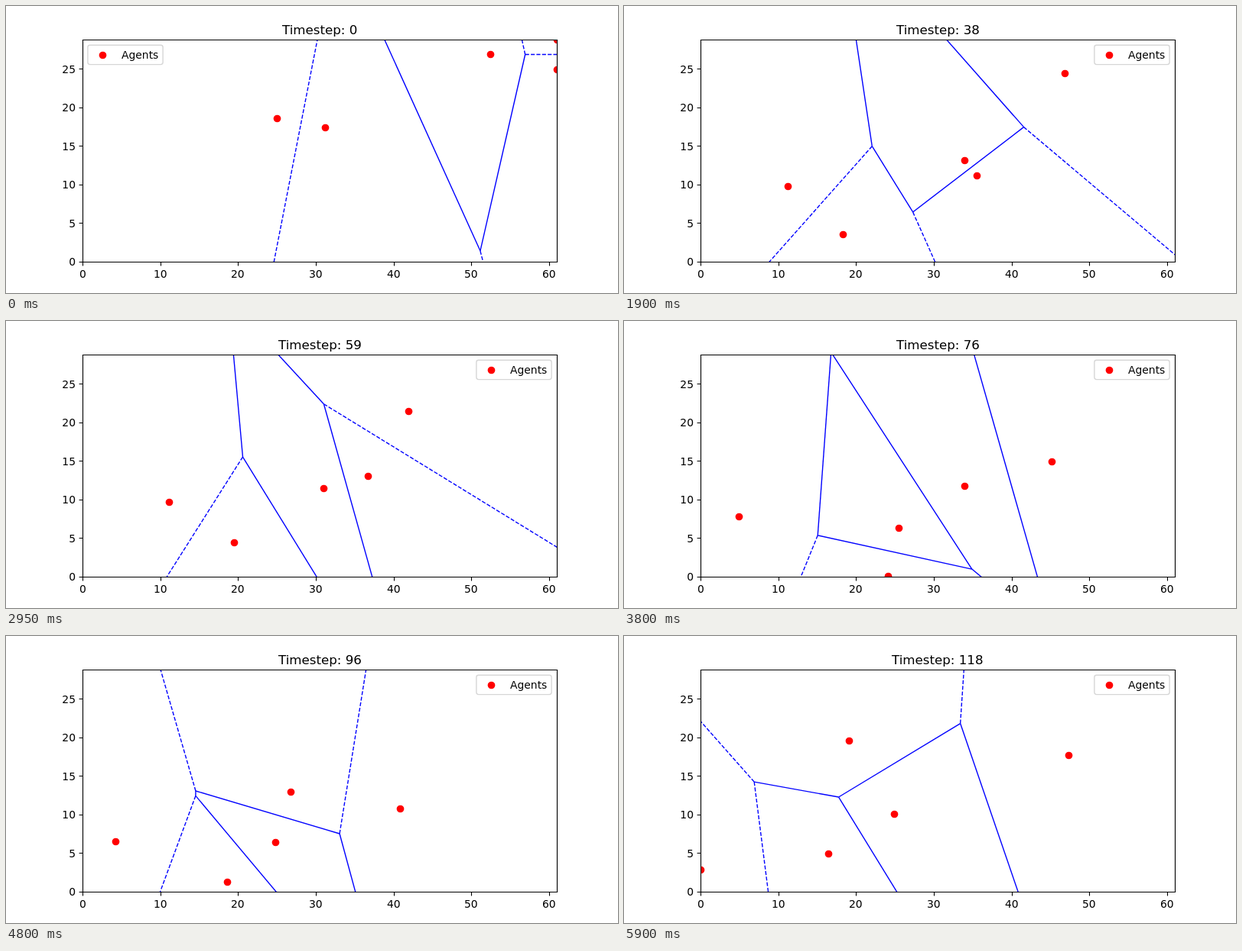
An HTML page for the animation above (5950 ms loop, 800x376 px).

```html
<!DOCTYPE html>
<html lang="en">
<head>
<meta charset="utf-8">
<title>Agents</title>
<style>
html, body { margin: 0; width: 100%; height: 100%; overflow: hidden; background: #fff; }
svg { display: block; width: 800px; height: 376px; }
text { font: 13.89px "DejaVu Sans", sans-serif; fill: #000; }
#title { font-size: 16.67px; }
.end { text-anchor: end; }
#axes { fill: none; stroke: #000; stroke-width: 1.11; }
#edges { stroke: #00f; stroke-width: 1.39; }
.ray { stroke-dasharray: 5.14 2.22; }
circle { fill: #f00; r: 4.86px; }
#frame { fill: #fff; fill-opacity: .8; stroke: #ccc; stroke-opacity: .8; stroke-width: 1.39; }
</style>
</head>
<body>
<svg viewBox="0 0 800 376">
  <clipPath id="plot"><rect x="100" y="44" width="621" height="292"/></clipPath>
  <g clip-path="url(#plot)">
    <g id="edges"></g>
    <g id="dots"></g>
  </g>
  <path id="axes"/>
  <g id="labels"></g>
  <text id="title" y="37"></text>
  <g id="legend">
    <rect id="frame" x="106.9" y="51.2" width="98.2" height="25.4" rx="2.8"/>
    <circle cx="126.5" cy="64.5" r="4.86"/>
    <text x="151" y="69">Agents</text>
  </g>
</svg>
<script>
const STEP = 50, STEPS = 119;
const LEFT = 100, RIGHT = 720, TOP = 44.24, BOTTOM = 334.53;
const KX = 620 / 61, KY = 10.097;
const $ = id => document.getElementById(id);
const clamp = (v, lo, hi) => Math.min(hi, Math.max(lo, v));
const snap = v => Math.floor(v + .5) + .5;

// Each agent glides through one waypoint per time, in pixels
const times = [0, 19, 38, 59, 76, 96, 118];
const agents = [
  [[354, 147.2], [212, 243], [214, 236], [213, 237], [150, 256], [143.4, 268.8], [100, 306]],
  [[417.4, 159.4], [309, 197], [286, 299], [298, 290], [345, 334], [289, 321.8], [267, 285]],
  [[633, 63.2], [430, 191], [445.1, 201.9], [415, 219], [359, 271], [351.7, 270], [353, 233]],
  [[720, 44], [519, 201], [460.9, 222.2], [473, 203], [445, 216], [371.7, 203.7], [294, 137]],
  [[720, 82.8], [608, 138], [576, 88], [526, 118], [559, 184], [514.6, 226.4], [581, 156]]
];

// Smooth curve through the waypoints; the walls stop any overshoot
function along(way, t, axis) {
  const last = times.length - 1;
  let i = 0;
  while (i < last - 1 && t >= times[i + 1]) i++;
  const slope = k => {
    const a = Math.max(k - 1, 0), b = Math.min(k + 1, last);
    return (way[b][axis] - way[a][axis]) / (times[b] - times[a]);
  };
  const h = times[i + 1] - times[i], u = (t - times[i]) / h;
  const p = way[i][axis], d = way[i + 1][axis] - p;
  const m = slope(i) * h, n = slope(i + 1) * h;
  return p + u * (m + u * (3 * d - 2 * m - n + u * (m + n - 2 * d)));
}

const toData = p => [(p[0] - LEFT) / KX, (BOTTOM - p[1]) / KY];
const toPixel = p => [LEFT + p[0] * KX, BOTTOM - p[1] * KY];
const dist = (a, b) => Math.hypot(a[0] - b[0], a[1] - b[1]);

function circumcentre(a, b, c) {
  const bx = b[0] - a[0], by = b[1] - a[1], cx = c[0] - a[0], cy = c[1] - a[1];
  const d = 2 * (bx * cy - by * cx), bb = bx * bx + by * by, cc = cx * cx + cy * cy;
  return [a[0] + (cy * bb - by * cc) / d, a[1] + (bx * cc - cx * bb) / d];
}

// Finite ridges join two vertices; open ones run outwards from one
function voronoi(pts) {
  const n = pts.length, ridges = {};
  for (let i = 0; i < n; i++)
    for (let j = i + 1; j < n; j++)
      for (let k = j + 1; k < n; k++) {
        const v = circumcentre(pts[i], pts[j], pts[k]), r = dist(v, pts[i]);
        if (!isFinite(r)) continue;
        if (pts.some((p, q) => q !== i && q !== j && q !== k && dist(p, v) < r)) continue;
        for (const pair of [[i, j], [i, k], [j, k]]) (ridges[pair] ||= []).push(v);
      }
  const span = [0, 1].map(x => {
    const all = pts.map(p => p[x]);
    return Math.max(...all) - Math.min(...all);
  });
  const reach = Math.max(...span) ** 2 / Math.min(...span);
  const centre = [0, 1].map(x => pts.reduce((sum, p) => sum + p[x], 0) / n);
  return Object.entries(ridges).map(([pair, ends]) => {
    if (ends.length > 1) return { from: ends[0], to: ends[1] };
    const [a, b] = pair.split(",").map(i => pts[i]), len = dist(a, b), v = ends[0];
    const nx = (a[1] - b[1]) / len, ny = (b[0] - a[0]) / len;
    const out = ((a[0] + b[0]) / 2 - centre[0]) * nx + ((a[1] + b[1]) / 2 - centre[1]) * ny;
    const far = out < 0 ? -reach : reach;
    return { from: v, to: [v[0] + nx * far, v[1] + ny * far], open: true };
  });
}

// Dashes start where a ray enters the figure
function enter(p, q) {
  const t = [0, 1].map(x => {
    const d = q[x] - p[x], hi = x ? 377 : 801, lo = x ? -2 : -1;
    return d ? ((d > 0 ? lo : hi) - p[x]) / d : 0;
  });
  const u = clamp(Math.max(...t), 0, 1);
  return [p[0] + (q[0] - p[0]) * u, p[1] + (q[1] - p[1]) * u];
}

function edge({ from, to, open }) {
  let a = toPixel(from);
  const b = toPixel(to);
  if (open) a = enter(a, b);
  return `<line${open ? ' class="ray"' : ""} x1="${a[0]}" y1="${a[1]}" x2="${b[0]}" y2="${b[1]}"/>`;
}

// Centred text starts on a whole pixel
function centre(el, x) {
  el.setAttribute("x", Math.round(x - el.getComputedTextLength() / 2));
}

function drawAxes() {
  let path = "M100.5 44.5H720.5V335.5H100.5Z", labels = "";
  for (let v = 0; v <= 25; v += 5) {
    const y = BOTTOM - v * KY;
    path += `M100.5 ${snap(y)}h-4.9`;
    labels += `<text class="end" x="91" y="${Math.round(y + 5.5)}">${v}</text>`;
  }
  $("labels").innerHTML = labels;
  for (let v = 0; v <= 60; v += 10) {
    const x = LEFT + v * KX;
    path += `M${snap(x)} 335.5v4.9`;
    $("labels").insertAdjacentHTML("beforeend", `<text y="356">${v}</text>`);
    centre($("labels").lastChild, x);
  }
  $("axes").setAttribute("d", path);
}

function draw(step) {
  const pts = agents.map(way => [
    clamp(along(way, step, 0), LEFT, RIGHT),
    clamp(along(way, step, 1), TOP, BOTTOM)
  ]);
  $("dots").innerHTML = pts.map(([x, y]) =>
    `<circle cx="${snap(x)}" cy="${snap(y)}" r="4.86"/>`).join("");
  $("edges").innerHTML = voronoi(pts.map(toData)).map(edge).join("");
  $("title").textContent = "Timestep: " + step;
  centre($("title"), 410);
  // The legend keeps to the right corner unless an agent is there
  const taken = pts.some(([x, y]) => x > 615 && x < 713 && y > 51 && y < 77);
  $("legend").setAttribute("transform", `translate(${taken ? 0 : 508} 0)`);
}

let shown = -1;
function tick() {
  const step = Math.floor(performance.now() / STEP) % STEPS;
  if (step !== shown) draw(shown = step);
  requestAnimationFrame(tick);
}

drawAxes();
tick();
</script>
</body>
</html>
```
